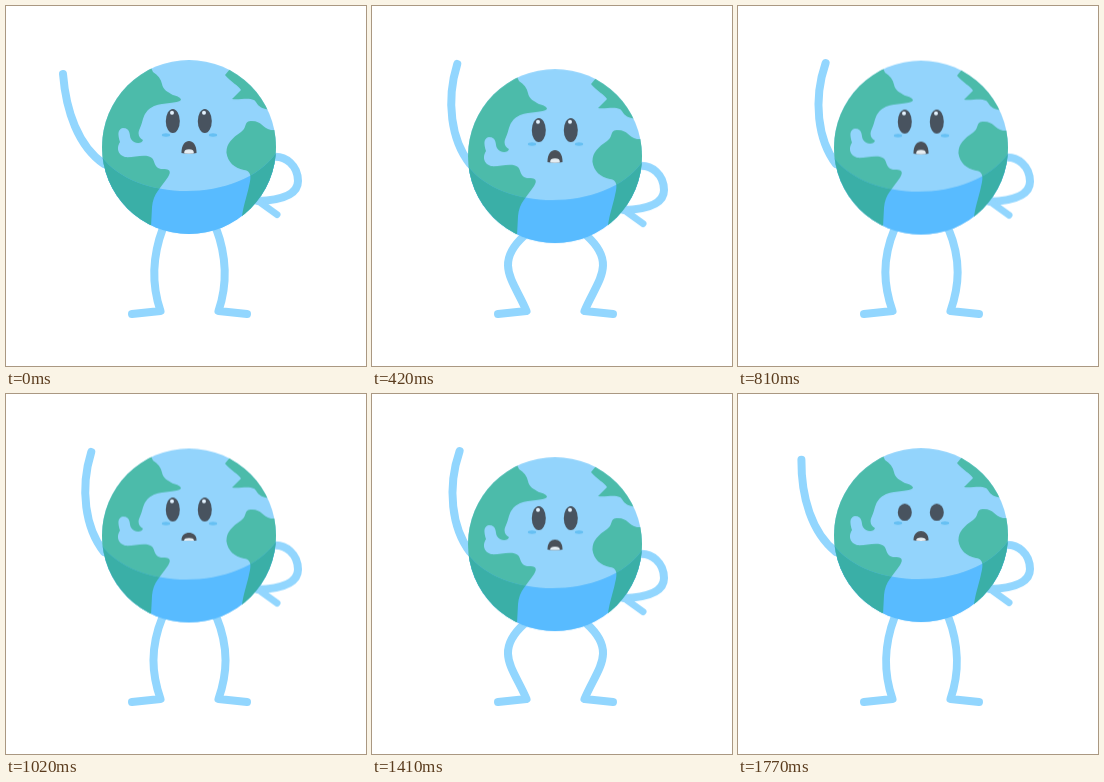
Recreate the animation shown at these times as an HTML page. Size 360 by 360 pixels, loop 1.8 s.

```html
<!DOCTYPE html>
<html lang="en">
<head>
<meta charset="utf-8">
<title>Waving globe</title>
<style>
  html, body { margin: 0; width: 100%; height: 100%; overflow: hidden; background: #fff; }
  svg { display: block; width: 100vw; height: 100vh; }

  .limb { fill: none; stroke: #92d6fe; stroke-width: 8; stroke-linecap: round; stroke-linejoin: round; }

  .bob, .leg { animation: bob 900ms -880ms cubic-bezier(.65, 0, .35, 1) infinite; }
  .leg { animation-name: bend; }
  .wave { animation: wave 300ms cubic-bezier(.37, 0, .63, 1) infinite; }
  .eyes { transform-origin: 183px 126.5px; animation: blink 1800ms ease-in-out infinite; }
  .shine { animation: shine 1800ms step-end infinite; }
  .mouth { transform-origin: 183px 144px; animation: talk 1800ms ease-in-out infinite; }

  @keyframes bob {
    0%, 100% { transform: translateY(0); }
    50% { transform: translateY(9.2px); }
  }
  @keyframes bend {
    0%, 100% { d: path("M157 222 C145 254 146 280 154.5 305 L126 308"); }
    50% { d: path("M152 230 C121 258 142 275 154.5 305 L126 308"); }
  }
  @keyframes wave {
    0%, 100% { d: path("M98 158 C72 140 60 105 57 68"); }
    50%, 68% { d: path("M98 158 C80 134 75 94 88 57"); }
  }
  @keyframes blink {
    0%, 90%, 100% { transform: scaleY(1); }
    94.5% { transform: scaleY(.12); }
    98.3% { transform: scaleY(.72); }
  }
  @keyframes shine {
    0% { opacity: 1; }
    92% { opacity: 0; }
    99.5% { opacity: 1; }
  }
  @keyframes talk {
    0%, 23%, 45%, 63%, 100% { transform: scaleY(1); }
    13.3% { transform: scaleY(.52); }
    33.3% { transform: scaleY(.8); }
    56.7% { transform: scaleY(.64); }
    70% { transform: scaleY(.72); }
    86.7% { transform: scaleY(.95); }
    93% { transform: scaleY(.6); }
    98.3% { transform: scaleY(.78); }
  }
</style>
</head>
<body>
<svg viewBox="0 0 360 360">
  <defs>
    <clipPath id="globe"><circle cx="183" cy="141" r="87"/></clipPath>
    <clipPath id="shade"><path d="M90 144 L96 151 C130 197 235 197 270 147 L280 140 V240 H90 Z"/></clipPath>
    <clipPath id="lips"><path id="lipShape" d="M175.5 147 C175 131 191 131 190.5 147 Q183 148.5 175.5 147 Z"/></clipPath>
    <g id="land">
      <path d="M140 50 L147 66 C152 69 155 73 156 78 C157 84 162 86 167 89 C172 90 175 92 175 94
        C171 98 158 96 148 100 C136 106 138 114 134 122 C131 128 133 132 137 134
        C136 138 128 138 125 133 C123 129 125 122 117 122 C111 123 112 130 114 136
        C110 142 112 149 119 151 C127 152 140 147 146 152 C149 155 148 162 155 163
        C163 163 166 164 162 171 C155 182 147 187 146 201 L144 240 H80 V50 Z"/>
      <path d="M228 58 L219 69 C225 76 233 80 235 84 L226 93 C234 94 242 91 248 94
        C252 97 251 102 264 104 L290 100 L240 50 Z"/>
      <path d="M290 124 H265 C256 122 256 115 246 115 C237 115 242 121 235 126
        C226 132 220 138 220.5 147 C222 156 228 162 238 164 C246 165 245 172 243 180
        C241 190 238 197 236 210 L290 220 Z"/>
    </g>
  </defs>

  <g class="limb">
    <path class="leg" d="M157 222 C145 254 146 280 154.5 305 L126 308"/>
    <g transform="translate(367) scale(-1 1)">
      <path class="leg" d="M157 222 C145 254 146 280 154.5 305 L126 308"/>
    </g>
    <path class="wave" d="M98 158 C72 140 60 105 57 68"/>
  </g>

  <g class="bob">
    <g class="limb">
      <path d="M266 151 C280 149 292 160 292 175 C292 188 278 194 252 195"/>
      <path d="M255 197 L271 208.500" stroke-width="7"/>
    </g>

    <g clip-path="url(#globe)">
      <rect x="90" y="50" width="190" height="190" fill="#93d4fc"/>
      <use href="#land" fill="#4cbbaa"/>
      <g clip-path="url(#shade)">
        <rect x="90" y="130" width="190" height="110" fill="#58bbff"/>
        <use href="#land" fill="#3aafa7"/>
      </g>
    </g>

    <g fill="#66c0f3">
      <ellipse cx="160" cy="129" rx="4.200" ry="1.700"/>
      <ellipse cx="207" cy="129" rx="4.200" ry="1.700"/>
    </g>
    <g class="eyes">
      <g fill="#48535f">
        <ellipse cx="166.800" cy="115" rx="7" ry="12"/>
        <ellipse cx="198.800" cy="115" rx="7" ry="12"/>
      </g>
      <g class="shine" fill="#e4f3ff">
        <circle cx="166" cy="106.800" r="2"/>
        <circle cx="198" cy="106.800" r="2"/>
      </g>
    </g>
    <g class="mouth">
      <use href="#lipShape" fill="#4a5058"/>
      <ellipse cx="183" cy="146.500" rx="4.800" ry="3.200" fill="#e6eef3" clip-path="url(#lips)"/>
    </g>
  </g>
</svg>
</body>
</html>
```
